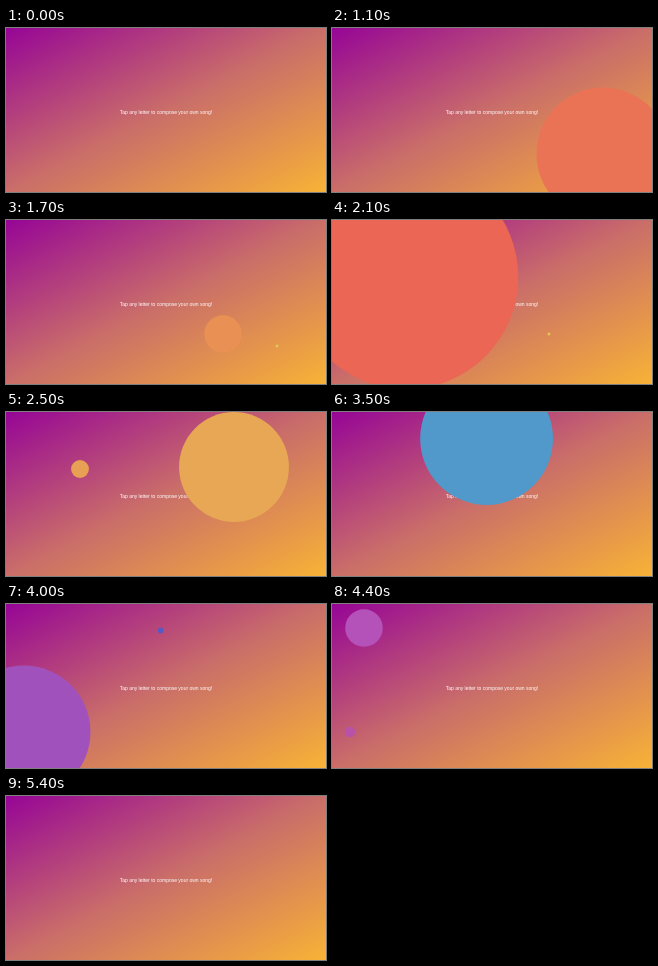
Recreate the animation shown at these times as an HTML page. Size 320 px wide and 164 px high, loop 5.5 s.

```html
<!DOCTYPE html>
<html lang="en">
<head>
<meta charset="utf-8">
<title>Tap any letter</title>
<style>
  html, body { margin: 0; width: 100%; height: 100%; overflow: hidden; }
  body { background: linear-gradient(to bottom right, #960596, #ca6e69, #f8b236); }
  svg { display: block; width: 100vw; height: 100vh; }
  text { font: 5px "Liberation Sans", Arial, sans-serif; fill: #fff; text-anchor: middle; }
</style>
</head>
<body>
<svg viewBox="0 0 320 164">
  <text x="160" y="85.8">Tap any letter to compose your own song!</text>
</svg>
<script>
const LOOP = 5500, STEP = 100, TICK = 1000 / 60;
const RADIUS = 125, SHRINK = 0.9;  // every circle shrinks by 10% per tick
const RED = 6, ORANGE = 26, GREEN = 146, BLUE = 199, PURPLE = 279;

const svg = document.querySelector("svg");

// Adds a circle born at the given time; returns its drawing function.
function tap(birth, x, y, hue) {
  const circle = document.createElementNS(svg.namespaceURI, "circle");
  circle.setAttribute("cx", x);
  circle.setAttribute("cy", y);
  svg.append(circle);
  return now => {
    const age = (now - birth) / TICK;
    const h = hue + age;  // one degree per tick; cooler hues are duller and darker
    circle.setAttribute("r", age > 0 ? RADIUS * SHRINK ** age : 0);
    circle.setAttribute("fill", `hsl(${h}, ${80 - h / 8}%, ${63 - h / 28}%)`);
  };
}

const taps = [
  tap(400, 264, 148, RED),
  tap(1000, 271, 126, RED),
  tap(1400, 217, 114, RED),
  tap(2083, 74, 57, RED),
  tap(2370, 228, 55, ORANGE),
  tap(2567, 180, 151.2, GREEN),
  tap(3080, 130, 40, GREEN),
  tap(3400, 154.6, 26.5, BLUE),
  tap(3900, 18, 128, PURPLE),
  tap(4100, 32, 24, PURPLE),
];

const begin = performance.now();
function frame() {
  const time = (performance.now() - begin) % LOOP;
  const now = Math.floor(time / STEP) * STEP;
  taps.forEach(draw => draw(now));
  requestAnimationFrame(frame);
}
frame();
</script>
</body>
</html>
```
